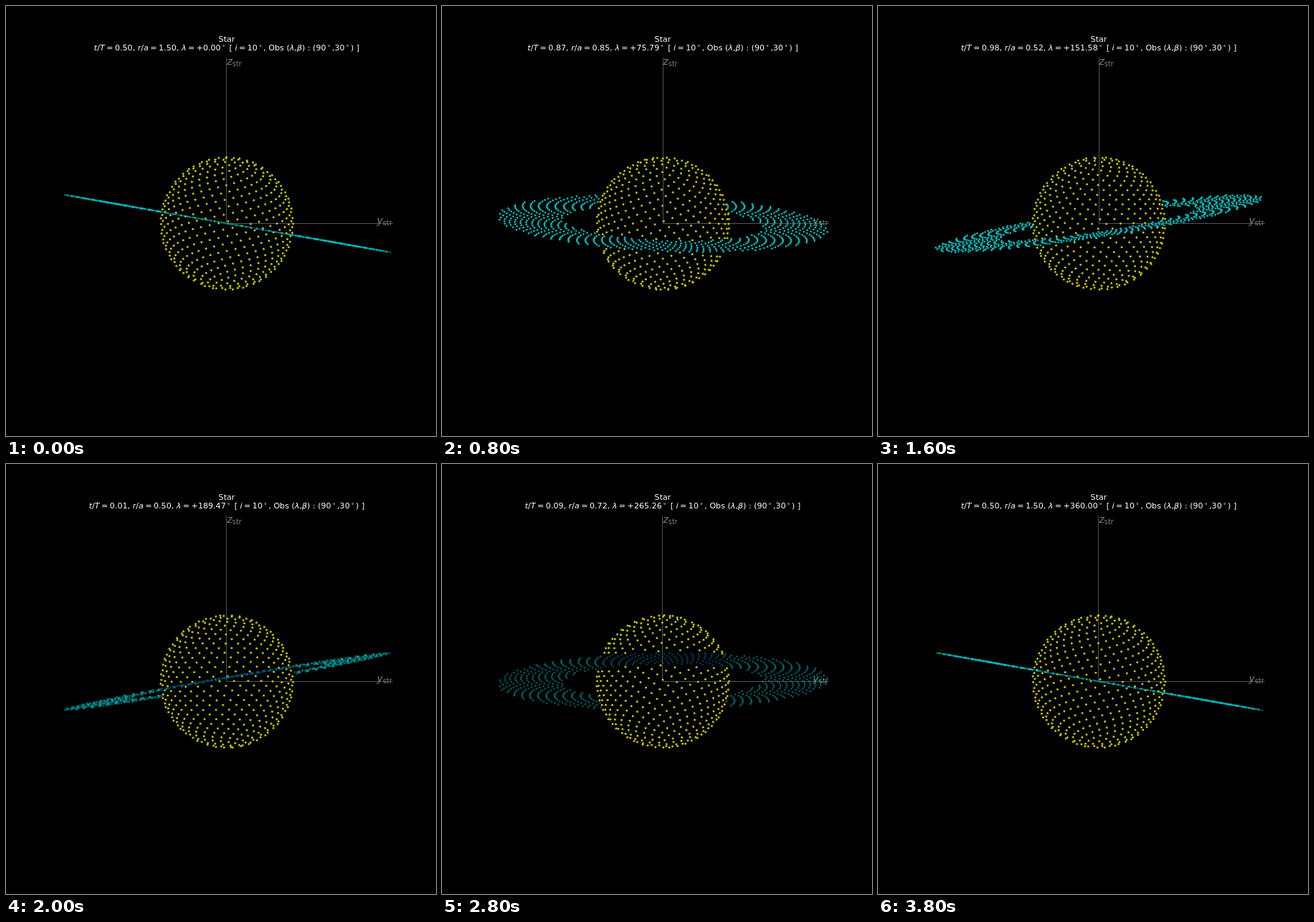
An HTML page with a canvas that plays this animation: 600 px wide and 600 px high, repeating every 4000 ms.

```html
<!DOCTYPE html>
<html lang="en">
<head>
<meta charset="utf-8">
<title>Star and ring</title>
<style>
  html, body { margin: 0; width: 100%; height: 100%; overflow: hidden; background: #000; }
  #stage { position: absolute; left: 0; top: 0; width: 600px; height: 600px; overflow: hidden;
    font-family: "DejaVu Sans", Verdana, sans-serif; }
  canvas, svg { position: absolute; left: 0; top: 0; }
  .line { position: absolute; left: 8px; width: 600px; height: 14px; line-height: 14px;
    text-align: center; white-space: pre; color: #fff; font-size: 11.11px; }
  b { font-weight: normal; margin: 0 .22em; }
  s { text-decoration: none; position: relative; top: -.55em; line-height: 0;
    font-size: .7em; margin: 0 .25em 0 .2em; }
</style>
</head>
<body>
<div id="stage">
  <svg width="600" height="600" font-size="13.9" fill="#808080">
    <path id="zAxis" d="M307.5 72V303" stroke="#555"/>
    <path d="M308 303.5H540" stroke="#555"/>
    <text x="308.5" y="82"><tspan font-style="italic">z</tspan><tspan font-size="9.8" dy="2">str</tspan></text>
    <text x="517.5" y="304"><tspan font-style="italic">y</tspan><tspan font-size="9.8" dy="2">str</tspan></text>
  </svg>
  <canvas id="view" width="600" height="600"></canvas>
  <div class="line" style="top:40px">Star</div>
  <div class="line" style="top:52px"><i>t</i>/<i>T</i><b>=</b><span id="phase"></span>, <i>r</i>/<i>a</i><b>=</b><span id="dist"></span>, <i>λ</i><b>=</b><span id="lon"></span><s>∘</s> [ <i>i</i><b>=</b>10<s>∘</s>, Obs (<i>λ</i>,<i>β</i>) : (90<s>∘</s>,30<s>∘</s>) ]</div>
</div>
<script>
const TAU = 2 * Math.PI, STEPS = 20, STEP_MS = 200;
const CX = 308.2, CY = 303.4, R = 92.5;
const COUNT = 800, INNER = 1.5, OUTER = 2.5, ECC = 0.5;
const TILT = Math.PI / 18, S = Math.sin(TILT), C = Math.cos(TILT);
const byId = id => document.getElementById(id);
const ctx = byId('view').getContext('2d');

// Golden-angle spirals; the common axis leans by TILT towards +y.
const tilt = (x, y, z) => [x, y * C + z * S, z * C - y * S];
const spiral = place => Array.from({ length: COUNT }, (_, k) => {
  const i = k + 0.5;
  const [r, z] = place(i / COUNT);
  const a = Math.PI * (1 + Math.sqrt(5)) * i + Math.PI / 2;
  return tilt(r * Math.cos(a), r * Math.sin(a), z);
});
const star = spiral(u => {
  const z = 1 - 2 * u;
  return [Math.sqrt(1 - z * z), z];
});
const ring = spiral(u => [Math.sqrt(INNER ** 2 + (OUTER ** 2 - INNER ** 2) * u), 0]);

function dot(y, z, radius, color) {
  ctx.fillStyle = color;
  ctx.beginPath();
  ctx.arc(CX + y * R, CY - z * R, radius, 0, TAU);
  ctx.fill();
}

function drawScene(lon) {
  const sin = Math.sin(lon), cos = Math.cos(lon);
  const turn = ([x, y, z]) => [x * cos + y * sin, y * cos - x * sin, z];
  const [nx, ny, nz] = turn([0, S, C]);
  const edgeOn = Math.abs(nx) < 1e-6;
  const lit = nx > 1e-6;

  // True where the ring lies between the point and the viewer on +x.
  const covered = (x, y, z) => {
    if (edgeOn) return false;
    const hit = -(ny * y + nz * z) / nx;
    const d = Math.hypot(hit, y, z);
    return hit > x && d > INNER && d < OUTER;
  };

  ctx.clearRect(0, 0, 600, 600);
  for (const p of star) {
    const [x, y, z] = turn(p);
    if (x > 0 && !covered(x, y, z)) dot(y, z, 1.5, '#c4c400');
  }
  for (const p of ring) {
    const [x, y, z] = turn(p);
    const overStar = y * y + z * z < 1;
    if (overStar && x < 0) continue;
    const dim = overStar && !edgeOn ? 'rgba(0,128,176,.45)' : 'rgba(0,191,191,.47)';
    dot(y, z, 1.35, lit ? '#00bfbf' : dim);
  }
}

function drawTitle(lon) {
  const nu = lon - Math.PI;
  const e = 2 * Math.atan(Math.sqrt((1 - ECC) / (1 + ECC)) * Math.tan(nu / 2));
  const phase = ((e - ECC * Math.sin(e)) / TAU + 1) % 1;
  const dist = (1 - ECC ** 2) / (1 + ECC * Math.cos(nu));
  byId('phase').textContent = phase.toFixed(2);
  byId('dist').textContent = dist.toFixed(2);
  byId('lon').textContent = '+' + (lon * 360 / TAU).toFixed(2);
}

let shown = -1;
function tick() {
  const step = Math.floor(performance.now() / STEP_MS) % STEPS;
  if (step !== shown) {
    shown = step;
    const lon = TAU * step / (STEPS - 1);
    drawScene(lon);
    drawTitle(lon);
    byId('zAxis').setAttribute('d', `M${Math.sin(lon) > 1e-6 ? 308.5 : 307.5} 72V303`);
  }
  requestAnimationFrame(tick);
}
tick();
</script>
</body>
</html>
```
